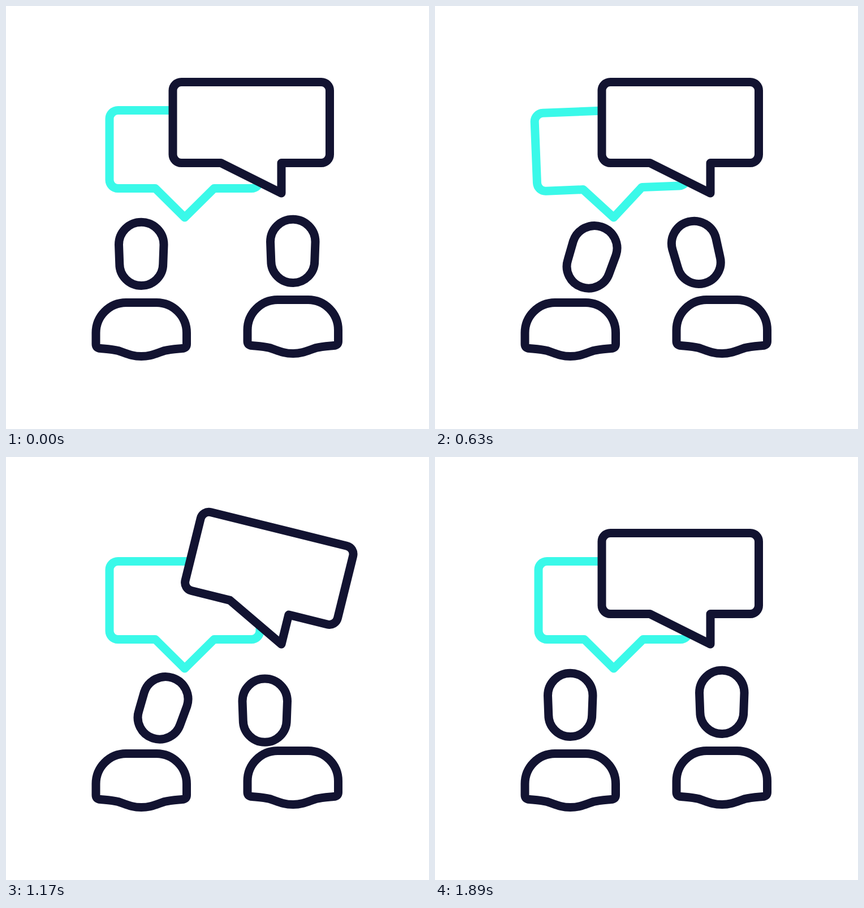
An HTML page for the animation above (3420 ms loop, 748 px wide and 748 px high).

```html
<!DOCTYPE html>
<html lang="en">
<head>
<meta charset="utf-8">
<title>Conversation</title>
<style>
  html, body { margin: 0; width: 100%; height: 100%; overflow: hidden; background: #fff; }
  svg { display: block; width: 100vw; height: 100vh; }
  path { fill: #fff; stroke: #121331; stroke-width: 15; stroke-linejoin: round; stroke-linecap: round; }
  #backBubble { stroke: #3af9e9; }
  .head { fill: none; }
</style>
</head>
<body>
<svg viewBox="0 0 748 748">
  <defs>
    <path id="headShape" class="head" d="M-39.75-17.5A39.75 39.75 0 0 1 39.75-17.5L38.5 16.5A38.5 38.5 0 0 1-38.5 16.5Z"/>
    <!-- bottom centre of the body is the origin -->
    <path id="bodyShape" d="M-80.25-49A53.5 53.5 0 0 1-27-102.5H27A53.5 53.5 0 0 1 80.25-49V-29Q80.25-22 72-21.5C61-20.5 51-20 41-17.5C27-13 17-7.5 0-7.5S-27-13-41-17.5C-51-20-61-20.5-72-21.5Q-80.25-22-80.25-29Z"/>
  </defs>
  <path id="backBubble" d="M198 184.5H434A15 15 0 0 1 449 199.5V307.5A15 15 0 0 1 434 322.5H368L316 374L264 322.5H198A15 15 0 0 1 183 307.5V199.5A15 15 0 0 1 198 184.5Z"/>
  <path id="frontBubble" d="M310 134.5H557.5A15 15 0 0 1 572.5 149.5V262.5A15 15 0 0 1 557.5 277.5H487V331L380 277.5H310A15 15 0 0 1 295 262.5V149.5A15 15 0 0 1 310 134.5Z"/>
  <use id="leftBody" href="#bodyShape"/>
  <use id="rightBody" href="#bodyShape"/>
  <use id="leftHead" href="#headShape"/>
  <use id="rightHead" href="#headShape"/>
</svg>
<script>
const LOOP = 3420, STEP = 30, LAST = 1890, FRONT_DELAY = 870;

const clamp = v => Math.min(Math.max(v, 0), 1);
const ease = (t, from, to) => (1 - Math.cos(Math.PI * clamp((t - from) / (to - from)))) / 2;

// Eases from 0 to 1, holds, and eases back.
const hold = (t, inFrom, inTo, outFrom, outTo) => ease(t, inFrom, inTo) - ease(t, outFrom, outTo);

// Damped swing that fades in and out within its length.
function spring(t, size, halfPeriod, decay, length) {
  const fade = clamp(t / (.15 * length)) * clamp((length - t) / (.3 * length));
  return fade && size * fade * Math.exp(-t / decay) * Math.sin(Math.PI * t / halfPeriod);
}

const wobble = t => spring(t, -39, 220, 320, 1020);
const squash = t => spring(t, .09, 260, 160, 420);

function leftLean(t) {
  const lean = hold(t, 0, 390, 1350, 1830);
  const sag = hold(t, 390, 540, 1170, 1410);
  return { dx: 36.2 * lean + 1.3 * sag, dy: 3.1 * lean + 2.3 * sag, tilt: 16.7 * lean + 1.5 * sag };
}

function rightLean(t) {
  const lean = hold(t, 0, 360, 1380, 1800);
  const nod = hold(t, 720, 1140, 1170, 1480);
  return { dx: -44.7 * lean - 4.8 * nod, dy: 2.5 * lean + 12.3 * nod, tilt: -14.5 * hold(t, 0, 420, 690, 1000) };
}

const place = (id, transform) =>
  document.getElementById(id).setAttribute('transform', transform);

function drawPerson(side, x, y, { dx, dy, tilt }, s) {
  place(side + 'Head', `translate(${x + dx} ${y + dy - 187.5}) rotate(${tilt})`);
  place(side + 'Body', `translate(${x} ${y}) scale(${1 + s} ${1 - s})`);
}

function draw(now) {
  const t = Math.min(Math.floor(now % LOOP / STEP) * STEP, LAST);
  place('backBubble', `rotate(${wobble(t)} 316 374)`);
  place('frontBubble', `rotate(${wobble(t - FRONT_DELAY)} 487 331)`);
  drawPerson('left', 239.25, 627, leftLean(t), squash(t) + squash(t - 1470));
  drawPerson('right', 507.25, 622, rightLean(t), squash(t) + squash(t - 1390));
}

const start = performance.now();
function tick() {
  draw(performance.now() - start);
  requestAnimationFrame(tick);
}
tick();
</script>
</body>
</html>
```
